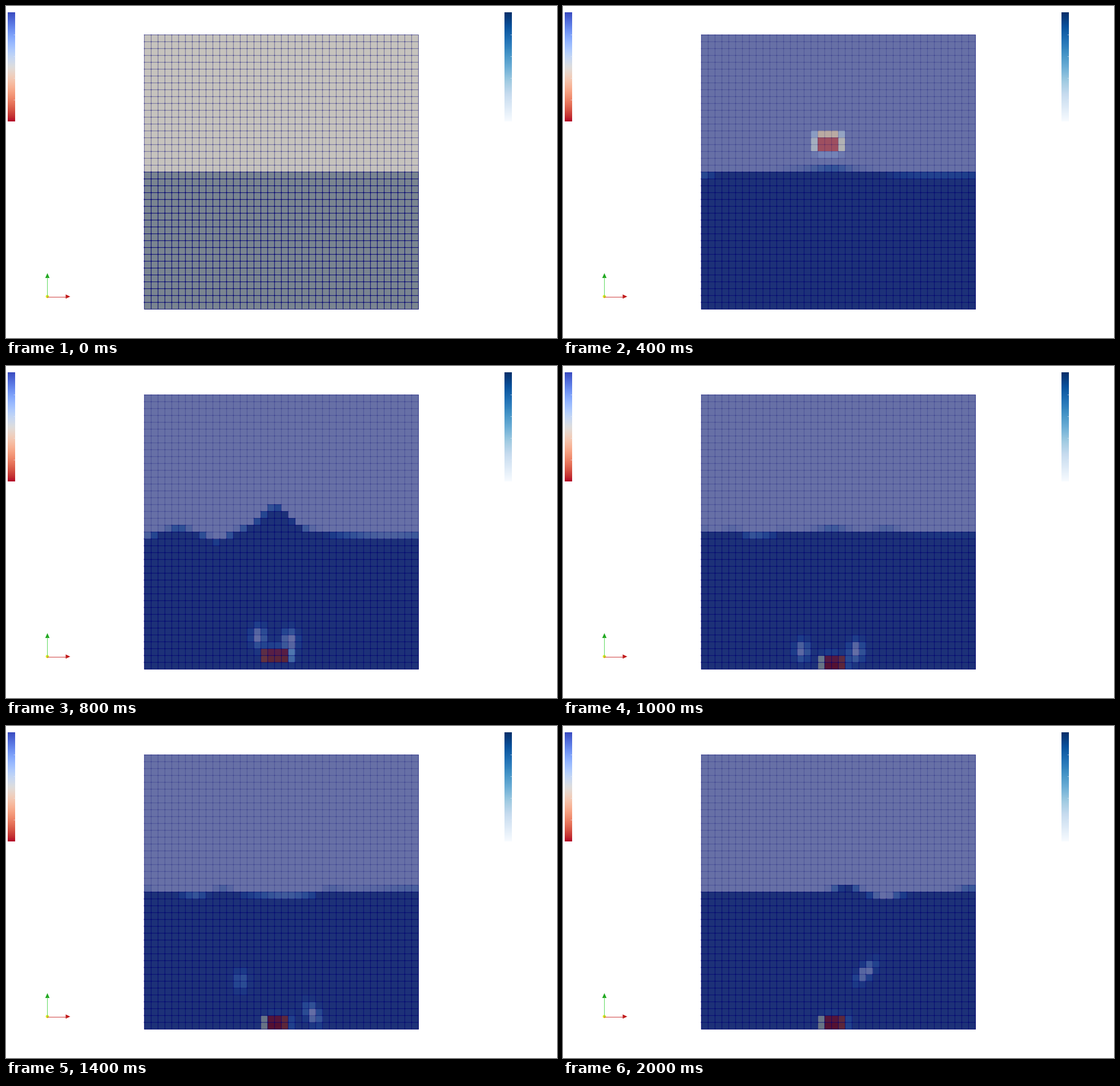
These frames come from a looping animation (965 by 581 pixels, 2200 ms). A matplotlib script:

```python
import numpy as np
import matplotlib as mpl
import matplotlib.pyplot as plt
from matplotlib.animation import FuncAnimation
from matplotlib.collections import PolyCollection
from matplotlib.patches import Circle, Polygon, Rectangle

W, H, DPI = 965, 581, 100
PX = 72 / DPI
N, STEP = 40, 12.0025
X0, Y0 = 242.3, 50.5
SIDE = N * STEP
BLUES, WARM = mpl.colormaps["Blues"], mpl.colormaps["coolwarm"]
NAVY = (0, 0, 0.45)
LEVEL = 20

# Cell centres, in cells from the top left corner
X, Y = np.meshgrid(np.arange(N) + 0.5, np.arange(N) + 0.5)

# Waves on the water: centre, height, width, step of the peak
WAVES = [
    (30.5, -0.12, 5, 1),
    (19.2, 3.7, 2.6, 3.6), (18, 1.3, 6.5, 3.2), (10.8, -1.4, 2.2, 3.8),
    (5, 0.65, 1.8, 4), (0.5, -1.2, 1.1, 3.2), (35.5, -1.05, 8, 3.3),
    (11.6, 1.05, 1.4, 6), (7.4, -1.2, 1.6, 6), (27, 1, 2, 6),
    (19.5, -0.25, 4, 6), (0.5, 0.5, 0.8, 6),
    (20.9, -1.25, 5, 8), (40.5, 1.05, 9, 8),
    (21.1, 1.05, 1.9, 10), (26.8, -1, 1.9, 10), (39.2, 0.5, 1.8, 10),
]


def bell(d, width):
    return np.exp(-(d / width) ** 2)


def water_level(step):
    rise = sum(h * bell(X[0] - x, w) * bell(step - peak, 1)
               for x, h, w, peak in WAVES)
    return LEVEL - rise


def overlap(centre, low, high):
    """Part of each unit cell that lies between low and high."""
    return np.clip(np.minimum(centre + 0.5, high)
                   - np.maximum(centre - 0.5, low), 0, 1)


def block(step):
    """Left, right, top and bottom of the falling body."""
    def at(*values):
        return np.interp(step, (1, 2, 3, 4, 5), values)
    return (at(16.5, 16.6, 17, 17.05, 17.5), at(20.4, 20.5, 20.85, 21.25, 20.95),
            at(6.25, 14.4, 26.1, 37, 38), at(9.05, 17.1, 28, 38.95, 40))


def bubbles(step):
    """Share of air in the wake of the body."""
    def at(*values):
        return np.interp(step, (3, 4, 6, 8, 10), values)

    def blob(x, y, amount, wx=0.9, wy=1.3, slant=0):
        return amount * bell(X - x - slant * (Y - y), wx) * bell(Y - y, wy)

    left = blob(at(16.5, 16.7, 12.7, 15.5, 15.5), at(25.6, 35.2, 39.3, 26.5, 20),
                at(1, 1, 0.8, 0.2, 0))
    right = blob(at(21.2, 21.2, 24, 25.1, 24), at(26.4, 35.7, 38.9, 36.5, 31.6),
                 1.1, slant=at(0, 0, 0, 0.7, -0.6))
    _, edge, top, bottom = block(step)
    seam = blob(edge + 0.5, (top + bottom) / 2, 0.22, 0.5, 1.2)
    gap = blob(19, top, at(0.6, 0.3, 0.1, 0.1, 0.1), 1.6, 0.8)
    return np.clip(left + right + seam + gap, 0, 0.95)


def fields(step):
    water = np.clip(Y + 0.5 - water_level(step), 0, 1)
    if step >= 3:
        water = water * (1 - bubbles(step))
    x1, x2, y1, y2 = block(step)
    return water, overlap(X, x1, x2) * overlap(Y, y1, y2)


def shade(step):
    """Face colours and edge colours of all cells."""
    water, solid = fields(step)
    if step == 0:
        wet = Y[..., None] > LEVEL
        faces = np.where(wet, (122, 133, 144), (198, 195, 189)) / 255
        low, high = 0.2, 0.5
    else:
        faces = 0.31 * BLUES(water)[..., :3] + 0.455 * WARM(solid)[..., :3]
        low, high = 0.1, 0.35
    edges = np.empty((N * N, 4))
    edges[:, :3] = NAVY
    edges[:, 3] = low + (high - low) * water.ravel()
    return faces, edges


fig = plt.figure(figsize=(W / DPI, H / DPI), dpi=DPI, facecolor="white")
ax = fig.add_axes([0, 0, 1, 1])


def bar(x, cmap, values):
    ax.imshow(cmap(values)[:, None, :], extent=(x, x + 13, 202, 11),
              interpolation="nearest", aspect="auto")
    for y in (49.6, 87.6, 125.6, 163.6):
        ax.plot([x + 10, x + 12.6], [y, y], color="#e6ecf6", lw=PX, alpha=0.6,
                solid_capstyle="butt")


def triad():
    ax.plot([72.4, 72.4], [508, 475], color="#5fd95f", lw=PX)
    ax.plot([72, 106], [508.6, 508.6], color="#cf4040", lw=PX)
    ax.add_patch(Polygon([(72.5, 467.5), (68.7, 476), (76.3, 476)],
                         fc="#22a822", ec="none"))
    ax.add_patch(Polygon([(112.5, 508.5), (104.5, 504.8), (104.5, 512.2)],
                         fc="#c01818", ec="none"))
    ax.add_patch(Circle((72.4, 508.4), 2.8, fc="#e8e81c", ec="none"))


ramp = np.linspace(0, 1, 191)
bar(3, WARM, ramp)
bar(873, BLUES, ramp[::-1])
triad()

mesh = ax.imshow(np.zeros((N, N, 3)), interpolation="nearest", aspect="auto",
                 extent=(X0, X0 + SIDE, Y0 + SIDE, Y0))
corners = np.array([(0, 0), (1, 0), (1, 1), (0, 1)])
quads = [(corners + (c, r)) * STEP + (X0, Y0)
         for r in range(N) for c in range(N)]
wires = PolyCollection(quads, facecolors="none", linewidths=1.15 * PX)
wires.set_snap(False)
ax.add_collection(wires)
nodes = ax.scatter(X0 + (X - 0.5) * STEP, Y0 + (Y - 0.5) * STEP,
                   s=(2.5 * PX) ** 2, linewidths=0)
ax.add_patch(Rectangle((X0, Y0), SIDE, SIDE, fill=False, lw=PX,
                       ec=(*NAVY, 0.35), snap=False))

ax.set_xlim(0, W)
ax.set_ylim(H, 0)
ax.axis("off")


def update(step):
    faces, edges = shade(step)
    mesh.set_data(faces)
    wires.set_edgecolor(edges)
    nodes.set_facecolor(edges)
    return mesh, wires, nodes


anim = FuncAnimation(fig, update, frames=11, interval=200, repeat=True,
                     repeat_delay=0, blit=False)
plt.show()
```
